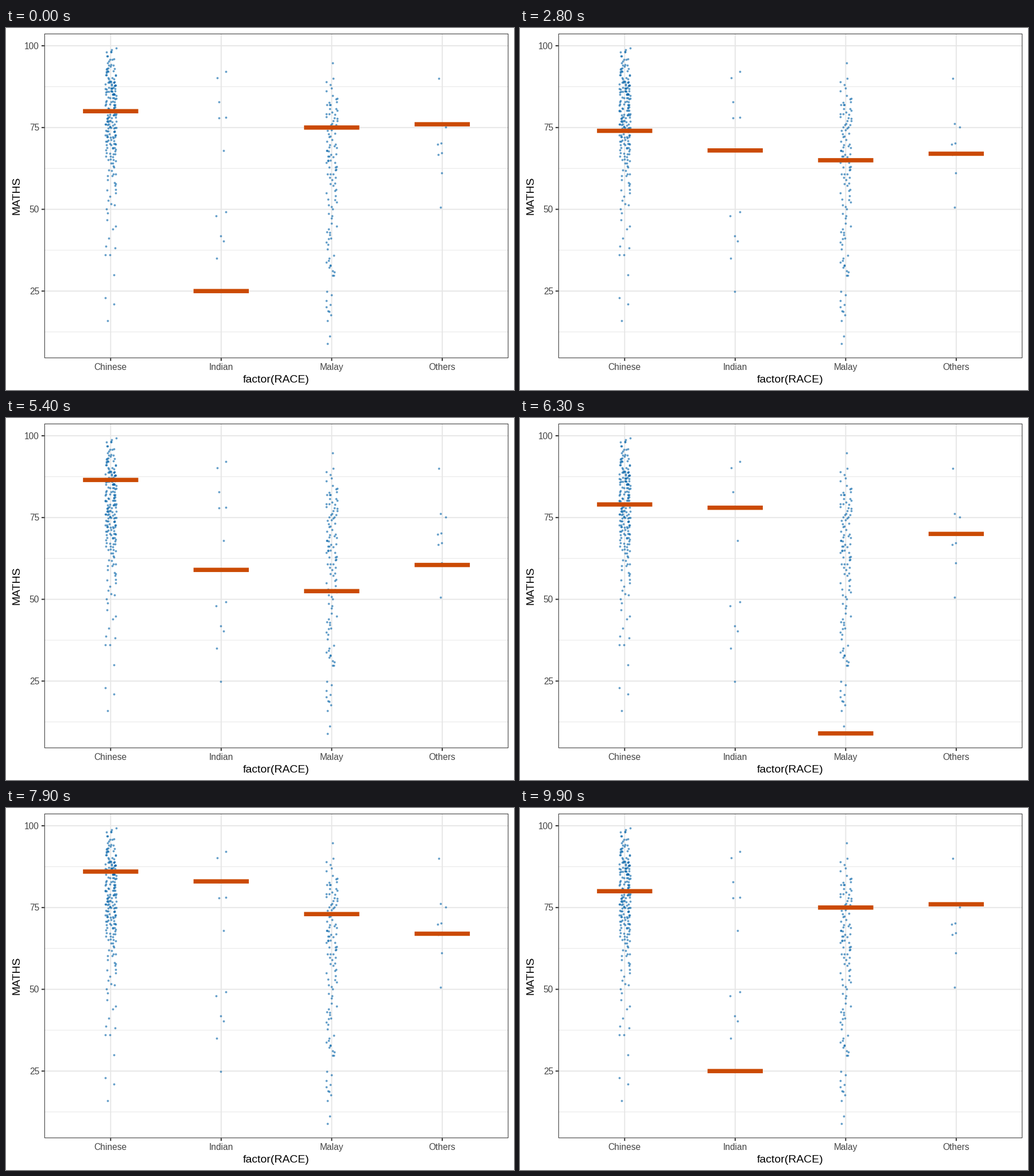
Animation, 885 px wide and 632 px high, one loop 10 s. Source, as a matplotlib script:

```python
import matplotlib.pyplot as plt
import numpy as np
from matplotlib.animation import FuncAnimation
from matplotlib.patches import Rectangle

W, H, DPI = 885, 632, 64
BLUE, ORANGE = "#0061a7", "#cb4a04"
GRID, DARK, LABEL = "#e6e6e6", "#2b2b2b", "#444444"
LEFT, RIGHT, TOP, BOTTOM = 66.8, 875.3, 9.9, 576.3
GROUPS = ["Chinese", "Indian", "Malay", "Others"]
BAR_W, BAR_H = 96.3, 7.5

plt.rcParams["font.family"] = "Liberation Sans"


def pt(px):
    return px * 72 / DPI


def group_x(i):
    return 182.3 + 192.55 * i


def score_y(score):
    return 31.05 + 5.71 * (100 - np.asarray(score, float))


fig = plt.figure(figsize=(W / DPI, H / DPI), dpi=DPI, facecolor="white")
ax = fig.add_axes([0, 0, 1, 1])
ax.set_xlim(0, W)
ax.set_ylim(H, 0)
ax.axis("off")


def line(x0, y0, x1, y1, color, width, z):
    ax.plot([x0, x1], [y0, y1], color=color, lw=pt(width), zorder=z,
            solid_capstyle="butt", snap=False)


def label(x, y, text, size, color, ha="center", rotation=0):
    ax.text(x, y, text, fontsize=pt(size), color=color, ha=ha, va="baseline",
            rotation=rotation, rotation_mode="anchor")


# Panel, grid, ticks and labels
for score in np.arange(12.5, 100, 25):
    line(LEFT, score_y(score), RIGHT, score_y(score), GRID, 0.95, 1)
for score in range(25, 101, 25):
    y = score_y(score)
    line(LEFT, y, RIGHT, y, GRID, 1.9, 1)
    line(LEFT - 4.9, y, LEFT, y, DARK, 1.9, 3)
    label(58, y + 5.6, str(score), 15.5, LABEL, ha="right")
for i, name in enumerate(GROUPS):
    x = group_x(i)
    line(x, TOP, x, BOTTOM, GRID, 1.9, 1)
    line(x, BOTTOM, x, BOTTOM + 4.9, DARK, 1.9, 3)
    label(x, 596.7, name, 15.5, LABEL)
ax.add_patch(Rectangle((LEFT + 0.5, TOP + 0.4), RIGHT - LEFT - 1, BOTTOM - TOP - 0.8,
                       fill=False, ec=DARK, lw=pt(1), zorder=6, snap=False))
label(471, 618.8, "factor(RACE)", 19.4, "black")
label(23.6, 293.1, "MATHS", 19.4, "black", rotation=90)

# Lone dots per group as (x offset, score)
LONE = [
    [(-9, 23), (6, 21), (-5, 16), (6, 30), (-8, 38.8), (8, 38.2), (-9, 36), (-1, 36),
     (-3, 41.2), (4, 43.9)],
    [(8, 92.1), (-7, 90.2), (-4, 82.9), (-4, 78), (8, 78.1), (4, 68),
     (8, 49.2), (-9, 48), (-1, 41.9), (4, 40.3), (-8, 35.1), (-1, 24.8)],
    [(2, 94.8), (3, 90), (-8, 24.9), (0, 23.9), (-9, 22.1), (-2, 20.8), (-9, 20.1),
     (-6, 18.9), (-4, 18.8), (-1, 17.7), (-7, 15.9), (-3, 11.2), (-7, 9)],
    [(-6, 90.1), (-3, 76.2), (6, 75.2), (-8, 69.8), (-2, 70.2), (-7, 66.8),
     (-1, 67.3), (-1, 61.1), (-3, 50.7)],
]
# Crowded groups: lowest score, then the number of dots in each five-point band
BANDS = {0: (45, [3, 5, 7, 10, 18, 28, 33, 28, 38, 21, 12]),
         2: (30, [9, 4, 7, 5, 7, 7, 12, 14, 10, 14, 11, 5])}

rng = np.random.default_rng(12)
dots = [(group_x(i) + dx, score_y(s)) for i, group in enumerate(LONE) for dx, s in group]
for i, (low, counts) in BANDS.items():
    for band, n in enumerate(counts):
        for k in range(n):
            score = low + 5 * band + int(5 * (k + 0.5) / n) + rng.uniform(-0.3, 0.3)
            dots.append((group_x(i) + rng.uniform(-9.6, 9.6), score_y(score)))
ax.scatter(*np.array(dots).T, s=pt(3.8) ** 2, color=BLUE, alpha=0.6, linewidths=0, zorder=4)

# One sampled score per group for every state
STATES = np.array([
    (80, 25, 75, 76), (77, 42, 34, 70), (97, 49, 66, 75), (74, 78, 63, 61),
    (67, 78, 24, 51), (91, 83, 66, 70), (76, 78, 50, 67), (74, 68, 65, 67),
    (91, 48, 62, 90), (64, 78, 65, 90), (67, 42, 34, 75), (89, 68, 58, 70),
    (79, 49, 62, 70), (86, 83, 30, 70), (87, 35, 75, 51), (74, 49, 63, 67),
    (79, 78, 9, 70), (95, 35, 63, 67), (90, 68, 66, 75), (76, 49, 34, 70),
    (86, 83, 73, 67), (78, 68, 30, 70), (76, 83, 63, 75), (79, 92, 9, 67),
    (77, 83, 66, 70),
], float)

bars = [ax.add_patch(Rectangle((group_x(i) - BAR_W / 2, 0), BAR_W, BAR_H, fc=ORANGE,
                               lw=0, zorder=5, snap=False)) for i in range(4)]


def update(frame):
    # Three frames of rest and one halfway; a rest in the middle is a frame shorter
    state, phase = divmod(frame + (frame >= 50), 4)
    scores = STATES[state % 25]
    if phase == 3:
        scores = (scores + STATES[(state + 1) % 25]) / 2
    for bar, y in zip(bars, score_y(scores)):
        bar.set_y(y - BAR_H / 2)
    return bars


anim = FuncAnimation(fig, update, frames=100, interval=100, repeat=True, repeat_delay=0)
plt.show()
```
